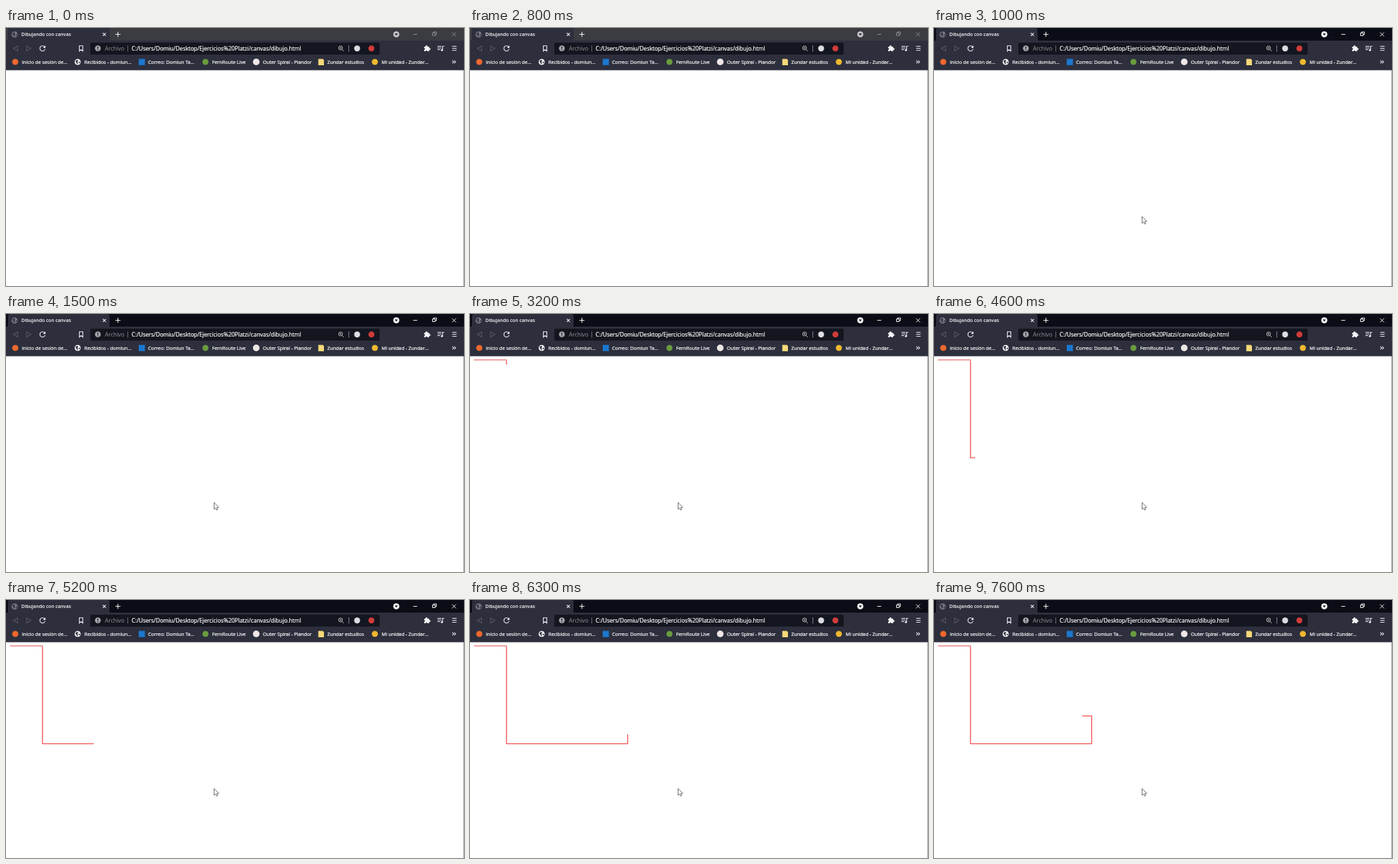
An HTML page for the animation above (8 s loop, 690 by 388 pixels).

```html
<!DOCTYPE html>
<html lang="es">
<head>
<meta charset="utf-8">
<title>Dibujando con canvas</title>
<style>
  html, body { margin: 0; width: 100%; height: 100%; overflow: hidden; background: #fff; }
  svg { display: block; width: 100%; height: 100%; }
  text { font-family: "Open Sans", "Noto Sans", sans-serif; fill: #fff; stroke: #fff; stroke-width: .22; }
  .tab { font-size: 7.1px; font-weight: 600; stroke: none; }
  .url { font-size: 8.5px; }
  .mark { font-size: 7.3px; }
  .faint { fill: #93949b; stroke: none; }
  .line { fill: none; stroke: #f4f4f6; stroke-width: 1.1; }
  .dim { stroke: #555762; }
  .soft { stroke: #b5b6bc; stroke-width: 1; }

  /* everything changes in hard steps on one 8 s clock */
  .bar, .ctl, .badge, .pointer, .trail { animation: 8s step-end infinite; }
  .bar { animation-name: bar; }
  .ctl { animation-name: ctl; }
  .badge { animation-name: badge; }
  .pointer { animation-name: pointer; }
  .trail {
    fill: none; stroke: url(#ink); stroke-width: 1.3;
    stroke-dasharray: 62 80; stroke-dashoffset: 62;
    animation-name: trail;
  }
  @keyframes bar { 0% { fill: #3b3b42; } 12.4%, 100% { fill: #0b0d16; } }
  @keyframes ctl { 0% { stroke: #8b8b92; } 12.4%, 100% { stroke: #f4f4f6; } }
  @keyframes badge { 0% { fill: #c6c6cb; } 12.4%, 100% { fill: #fff; } }
  @keyframes pointer { 0% { opacity: 0; } 12.4%, 100% { opacity: 1; } }

  /* one unit is one key press; held keys repeat in even steps */
  @keyframes trail {
    0% { stroke-dashoffset: 62; }
    24.9% { stroke-dashoffset: 61; }
    28.65% { stroke-dashoffset: 60; }
    29.9% { stroke-dashoffset: 59; }
    32.4% { stroke-dashoffset: 58; }
    33.65% { stroke-dashoffset: 57; }
    36.15% { stroke-dashoffset: 56; }
    37.4% { stroke-dashoffset: 55; }
    39.9% { stroke-dashoffset: 54; }
    46.15% { stroke-dashoffset: 52; animation-timing-function: steps(4, end); }
    51.15% { stroke-dashoffset: 41; animation-timing-function: steps(3, end); }
    54.9% { stroke-dashoffset: 34; }
    56.15% { stroke-dashoffset: 33; }
    62.4% { stroke-dashoffset: 30; animation-timing-function: steps(2, end); }
    64.9% { stroke-dashoffset: 23; animation-timing-function: steps(6, end); }
    72.4% { stroke-dashoffset: 8; }
    73.65% { stroke-dashoffset: 7; }
    78.65% { stroke-dashoffset: 6; }
    82.4% { stroke-dashoffset: 5; }
    84.9% { stroke-dashoffset: 4; }
    87.4% { stroke-dashoffset: 3; }
    89.9% { stroke-dashoffset: 2; }
    92.4% { stroke-dashoffset: 1; }
    94.9%, 100% { stroke-dashoffset: 0; }
  }
</style>
</head>
<body>
<svg viewBox="0 0 690 388" preserveAspectRatio="none">
  <defs>
    <linearGradient id="ink" gradientUnits="userSpaceOnUse" x1="0" y1="70" x2="0" y2="71">
      <stop offset="0" stop-color="#ee8080"/>
      <stop offset="1" stop-color="#ee4646"/>
    </linearGradient>
    <g id="globe">
      <circle r="4.6"/>
      <path d="M-3.4-1.6L-.6-3.2 .8-1.4-.8.2.6 1.4-.4 3.6-1.8 1.4zM1.6.2L3.6-.8 3.4 1.6 2 2.2z" fill="#2d2f3d"/>
    </g>
  </defs>

  <rect width="690" height="388" fill="#fff"/>
  <rect x="689" y="63" width="1" height="325" fill="#a4a4a9"/>

  <!-- title bar -->
  <rect class="bar" width="690" height="20"/>
  <path d="M3 20V3Q3 0 6 0H153Q156 0 156 3V20z" fill="#2d2f3d"/>
  <use href="#globe" x="13" y="9.8" fill="#777984"/>
  <text class="tab" x="23" y="12.3">Dibujando con canvas</text>
  <path class="line" d="M145.8 7.3l4.6 4.6m0-4.6l-4.6 4.6"/>
  <path class="line" d="M164.8 9.5h7.6M168.6 5.7v7.6"/>
  <circle class="badge" cx="588" cy="9.5" r="4.6"/>
  <path d="M585.6 8.2h4.8L588 11.4z" fill="#20222d"/>
  <g class="ctl" fill="none" stroke-width="1">
    <path d="M613.5 9.5h6"/>
    <path d="M642.5 7.5h4v4h-4zM644 7.3V5.9h4.5V10h-1.8"/>
    <path d="M672 6.5l6 6m0-6l-6 6"/>
  </g>

  <!-- toolbar -->
  <rect y="19" width="690" height="44.5" fill="#2d2f3d"/>
  <path class="line dim" d="M17.5 27v7.5L11 30.7zM31 27v7.5l6.5-3.8z"/>
  <path class="line" d="M58.3 28.3A4 4 0 1 0 59 31.5"/>
  <path d="M59.4 26.3V30h-3.7z" fill="#f4f4f6"/>
  <path class="line" d="M110.5 26.7h5.2v8l-2.6-2.3-2.6 2.3z"/>
  <rect x="127" y="22" width="436" height="18" rx="2" fill="#14161f"/>
  <circle cx="138.4" cy="30.6" r="4.4" fill="#a3a4aa"/>
  <path d="M138.4 28v3.2m0 1v1.2" stroke="#14161f" stroke-width="1.2"/>
  <text class="url faint" x="149" y="33.7">Archivo</text>
  <path d="M183.5 26v9.5" stroke="#6d6e77"/>
  <text class="url" x="189.3" y="33.7">C:/Users/Domiu/Desktop/Ejercicios%20Platzi/canvas/dibujo.html</text>
  <path class="line soft" d="M501 30a3 3 0 1 0 6 0a3 3 0 1 0-6 0M506.2 32.2l2.8 2.8M502.5 30h3M504 28.5v3"/>
  <path d="M516.5 26v9.5" stroke="#85868e"/>
  <circle cx="529" cy="30.7" r="4.5" fill="#dcdce2"/>
  <circle cx="550.5" cy="30.7" r="4.5" fill="#cf3c3a"/>
  <g fill="#f4f4f6">
    <rect x="630" y="28" width="7.5" height="7" rx=".8"/>
    <circle cx="633.5" cy="27.5" r="1.5"/>
    <circle cx="638" cy="31.5" r="1.5"/>
    <circle cx="630" cy="31.5" r="1.2" fill="#2d2f3d"/>
    <circle cx="633.5" cy="35" r="1.2" fill="#2d2f3d"/>
    <circle cx="656.7" cy="33.3" r="1.5"/>
  </g>
  <path class="line" d="M650 27.5h6M650 30h6M650 32.5h4M657.7 33.3V27.5h2.5M672.3 27.5h6.5M672.3 30.5h6.5M672.3 33.5h6.5"/>

  <!-- bookmarks -->
  <circle cx="14" cy="51" r="4.6" fill="#f0682f"/>
  <use href="#globe" x="108" y="51" fill="#f2f2f5"/>
  <rect x="200" y="46.5" width="9.3" height="9.3" fill="#1c78cf"/>
  <circle cx="300.5" cy="51" r="4.6" fill="#699b3d"/>
  <circle cx="377" cy="51" r="5" fill="#eee7e5"/>
  <path d="M470.5 46.5h6.5l2 1.5v8h-8.5z" fill="#f6d978"/>
  <circle cx="555.7" cy="51" r="4.6" fill="#efb92e"/>
  <g class="mark">
    <text x="24" y="53.7">Inicio de sesión de...</text>
    <text x="118" y="53.7">Recibidos - domiun...</text>
    <text x="214" y="53.7">Correo: Domiun Ta...</text>
    <text x="310.5" y="53.7">FernRoute Live</text>
    <text x="387" y="53.7">Outer Spiral - Plandor</text>
    <text x="484" y="53.7">Zundar estudios</text>
    <text x="566" y="53.7">Mi unidad - Zundar...</text>
  </g>
  <path class="line" d="M672.5 48.8l2 2.2-2 2.2M675.3 48.8l2 2.2-2 2.2"/>

  <path class="trail" pathLength="62" d="M6 69H55V216.2H237.5V174.3H223.5"/>
  <path class="pointer" d="M313.5 283.5v10.3l2.3-2.2 1.5 3.3 1.7-.8-1.5-3.2h3.1z" fill="#fff" stroke="#4a4a4a" stroke-width=".8"/>
</svg>
</body>
</html>
```
